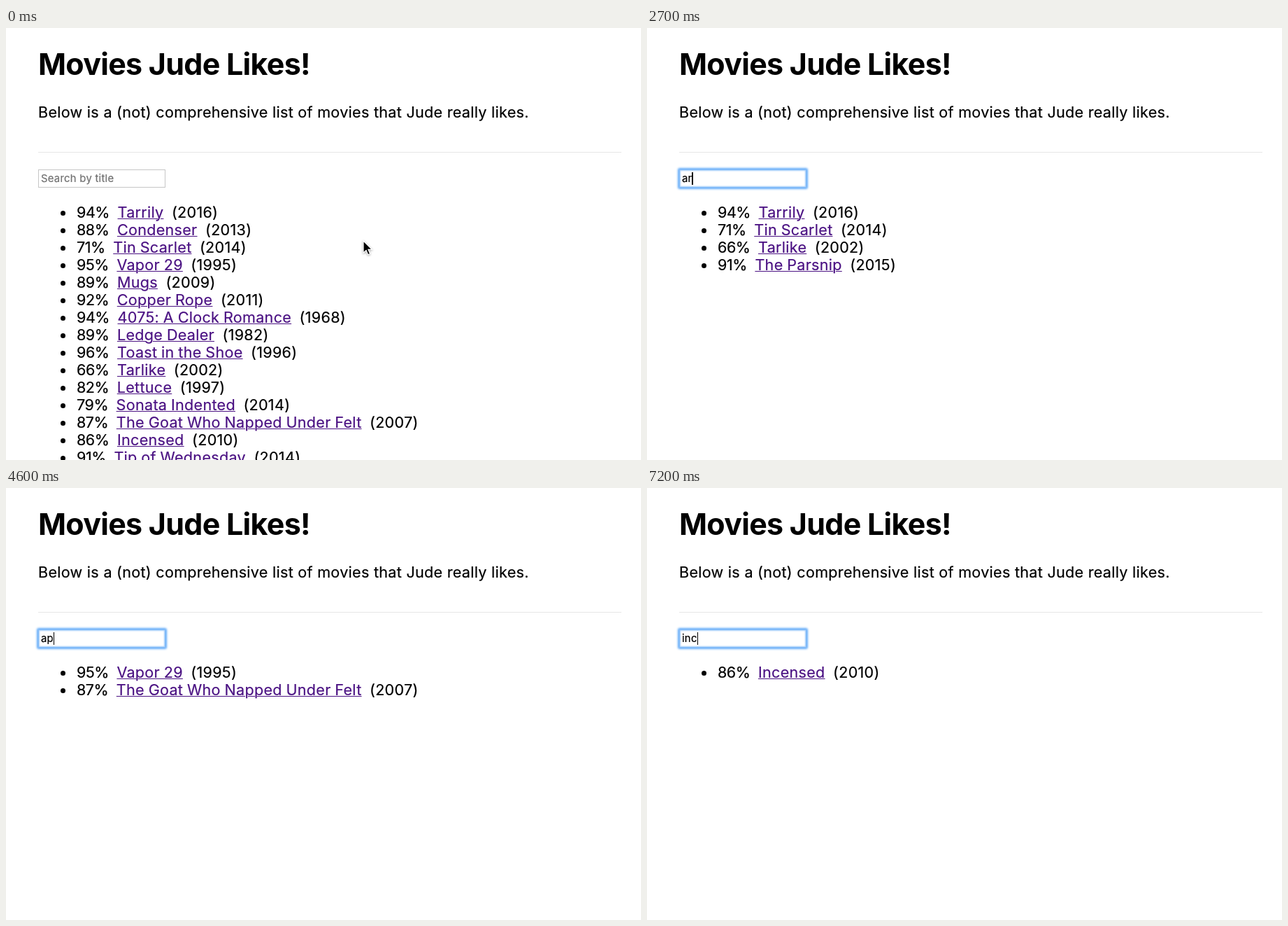
Animation, 908 px wide and 617 px high, one loop 7300 ms. Source, as an HTML page:

```html
<!DOCTYPE html>
<html lang="en">
<head>
<meta charset="utf-8">
<title>Movie search</title>
<style>
  html, body { margin: 0; width: 100%; height: 100%; overflow: hidden; background: #fff; }
  body {
    position: relative; color: #000; letter-spacing: .27px;
    font: 21.6px/25px Inter, "Open Sans", sans-serif; -webkit-text-stroke: .2px;
  }
  h1, p, hr, ul, #field, #mouse { position: absolute; margin: 0; padding: 0; white-space: pre; }
  h1 {
    left: 46px; top: 26px; font-size: 43px; line-height: 50px; font-weight: 700;
    letter-spacing: -.017em; -webkit-text-stroke: 0;
  }
  p { left: 46px; top: 108px; }
  hr { left: 46px; top: 177px; width: 834px; height: 1px; border: 0; background: #e6e6e6; }
  ul { left: 101px; top: 251px; list-style: none; word-spacing: -.6px; }
  li { position: relative; height: 25px; }
  li::before {
    content: ""; position: absolute; left: -23.5px; top: 9.5px;
    width: 7px; height: 7px; border-radius: 50%; background: #000;
  }
  li b { font-weight: 400; letter-spacing: -.5px; }
  li u { color: #4b1283; text-decoration-thickness: 1.4px; }
  #field {
    left: 46px; top: 202px; width: 182px; height: 26px; box-sizing: border-box;
    border: 1.4px solid #c6c6c6; background: #fff; font-size: 14.85px;
  }
  #field.focus {
    border-color: #86bdf8; border-radius: 1px;
    box-shadow: 0 0 3px 2px #64acf9, inset 0 0 2px 1px #a5cefa;
  }
  #text { position: absolute; left: 3px; top: 0; line-height: 24px; }
  .empty #text { color: #717171; }
  #caret { position: absolute; top: 3px; width: 1.3px; height: 18px; background: #000; }
  #mouse { left: 0; top: 0; overflow: visible; filter: drop-shadow(0 1.5px 1.5px rgba(0, 0, 0, .35)); }
  [hidden] { display: none !important; }
</style>
</head>
<body>
<h1>Movies Jude Likes!</h1>
<p>Below is a (not) comprehensive list of movies that Jude really likes.</p>
<hr>
<div id="field"><span id="text"></span><i id="caret"></i></div>
<ul id="list"></ul>
<svg id="mouse" width="16" height="24">
  <path d="M0 0V17.2L4 13.5L6.6 19.8L9.6 18.5L7 12.4H12.3Z" fill="#000" stroke="#fff" stroke-width="1.2"/>
</svg>
<script>
const LOOP = 7300, FOCUS = 1100;

const movies = [
  [94, "Tarrily", 2016],
  [88, "Condenser", 2013],
  [71, "Tin Scarlet", 2014],
  [95, "Vapor 29", 1995],
  [89, "Mugs", 2009],
  [92, "Copper Rope", 2011],
  [94, "4075: A Clock Romance", 1968],
  [89, "Ledge Dealer", 1982],
  [96, "Toast in the Shoe", 1996],
  [66, "Tarlike", 2002],
  [82, "Lettuce", 1997],
  [79, "Sonata Indented", 2014],
  [87, "The Goat Who Napped Under Felt", 2007],
  [86, "Incensed", 2010],
  [91, "Tip of Wednesday", 2014],
  [91, "The Parsnip", 2015],
  [96, "Proper Hammocks of the Sixth Tint", 1977],
  [92, "Sub Lamina", 2015]
];

const typing = [
  [0, ""], [1400, "a"], [1700, "ar"], [2100, "arr"],
  [2700, "ar"], [2800, "a"], [2900, ""],
  [3500, "a"], [3800, "ap"], [4000, "apo"],
  [4600, "ap"], [4700, "a"], [4900, ""],
  [5500, "i"], [5600, "in"], [5900, "inc"]
];
const blinks = [[6100, 6500], [6800, 7200]];

const $ = id => document.getElementById(id);
const field = $("field"), text = $("text"), caret = $("caret"), mouse = $("mouse");

const rows = movies.map(([score, title, year]) => {
  const li = document.createElement("li");
  li.innerHTML = `<b>${score}%</b>  <u>${title}</u>  (${year})`;
  $("list").append(li);
  return { li, key: title.toLowerCase() };
});

let shown = null;

function search(query) {
  if (query === shown) return;
  shown = query;
  text.textContent = query || "Search by title";
  field.classList.toggle("empty", !query);
  caret.style.left = 3 + (query ? text.getBoundingClientRect().width : 0) + "px";
  // Filtering starts at the second letter.
  for (const { li, key } of rows) li.hidden = query.length > 1 && !key.includes(query);
}

function moveMouse(t) {
  const k = Math.min(1, Math.max(0, (t - 600) / (FOCUS - 600)));
  const e = k * k * (3 - 2 * k);
  mouse.style.transform = `translate(${511 - 361 * e}px, ${304 - 91 * e}px)`;
  mouse.style.visibility = t < FOCUS ? "visible" : "hidden";
}

function draw() {
  const t = performance.now() % LOOP;
  const focused = t >= FOCUS;
  search(typing.findLast(([at]) => t >= at)[1]);
  field.classList.toggle("focus", focused);
  caret.hidden = !focused || blinks.some(([from, to]) => t >= from && t < to);
  moveMouse(t);
  requestAnimationFrame(draw);
}
draw();
</script>
</body>
</html>
```
